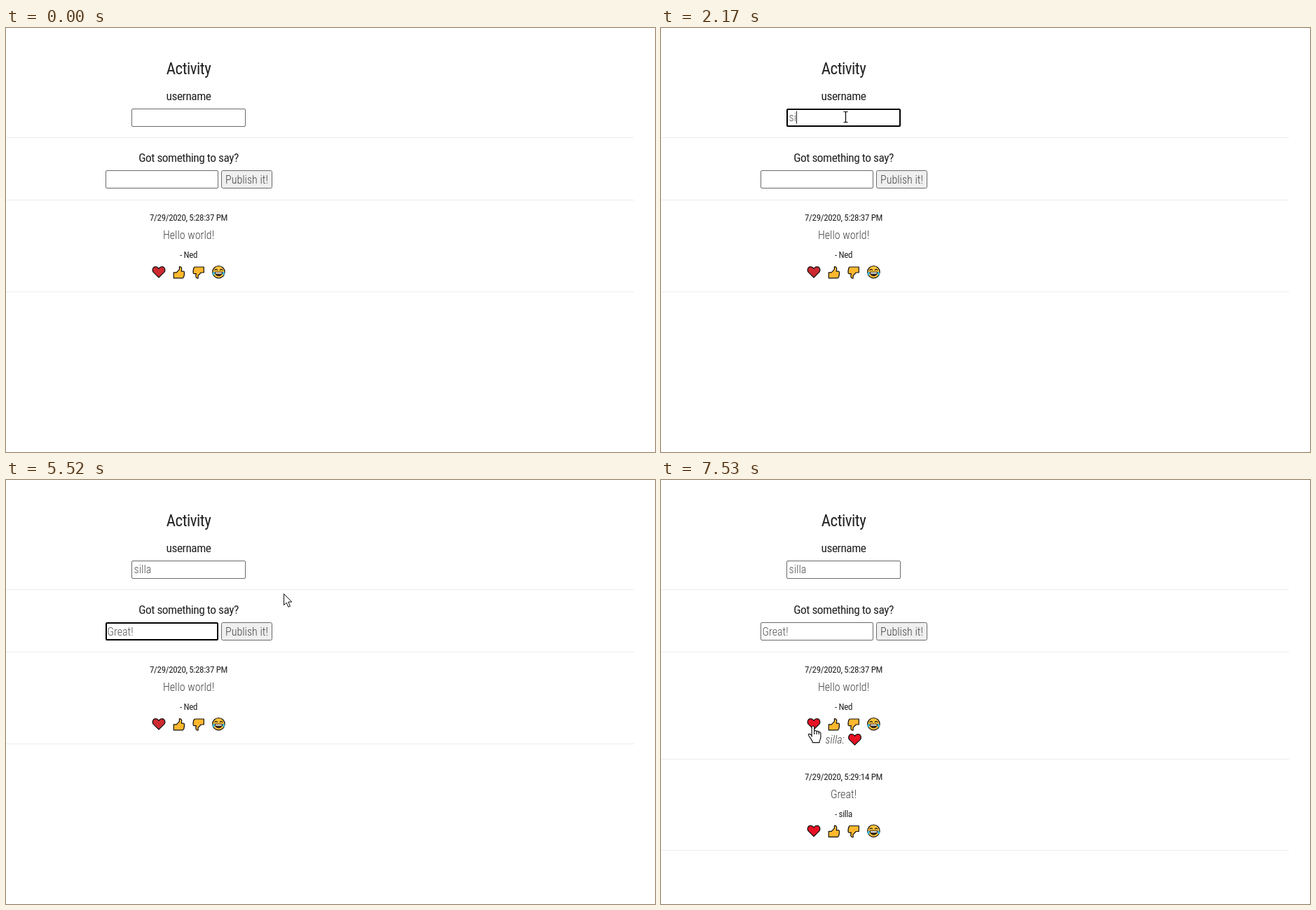
Animation, 926 px wide and 605 px high, one loop 8000 ms. Source, as an HTML page:

```html
<!DOCTYPE html>
<html lang="en">
<head>
<meta charset="utf-8">
<title>Message board</title>
<style>
  html, body { margin: 0; width: 100%; height: 100%; overflow: hidden; background: #fff; }
  svg { display: block; width: 926px; height: 605px; }
  text { font-family: "Roboto Condensed", Roboto, sans-serif; font-stretch: 75%; white-space: pre; }
  .mid { text-anchor: middle; }
  .head { fill: #222; font-size: 17.4px; letter-spacing: -.5px; }
  .title { font-size: 23px; }
  .small { font-size: 13px; letter-spacing: -.35px; }
  .body { fill: #444; font-size: 16px; font-weight: 300; }
  .typed { fill: #555; }
  .rule { stroke: #ececec; }
  .field, .button { fill: #fff; stroke: #6a6a6a; }
  .button { fill: #efefef; }
  .field.hover { stroke: #222; }
  .button.hover { fill: #e4e4e4; stroke: #333; }
  .ring { fill: none; stroke: #000; stroke-width: 2; }
  .caret { stroke: #222; }
</style>
</head>
<body>
<svg viewBox="0 0 926 605">
  <defs>
    <path id="heart" d="M0 8 -7.6 .6C-10.3-2.6-8.2-7.4-4.6-7.4-2.4-7.4-1-6.2 0-4.7 1-6.2 2.4-7.4 4.6-7.4 8.2-7.4 10.3-2.6 7.6.6Z" stroke="#111" stroke-width="1.2" stroke-linejoin="round"/>
    <path id="thumb" d="M-7.6 0H-3.6L.6-4.4V-8.2C3.6-8.6 4.8-5.6 3.4-1.6H6.2C8-1.6 8 .8 7.2 1.2 8.2 2 7.8 3.6 7 4 7.6 5 7.2 6 6.4 6.4 6.6 7.4 6 8 5 8H-7.6Z" fill="#ffb82e" stroke="#111" stroke-width="1.2" stroke-linejoin="round"/>
    <g id="laugh">
      <circle r="8.7" fill="#ffc23a" stroke="#111" stroke-width="1.2"/>
      <path d="M-5.8-2.4Q-3.7-5.4-1.6-2.4M1.6-2.4Q3.7-5.4 5.8-2.4" fill="none" stroke="#111" stroke-width="1.2"/>
      <path d="M-5.4 0H5.4C5 7.4-5 7.4-5.4 0Z" fill="#3b2a20" stroke="#111" stroke-width=".8"/>
      <path d="M-4.7.5H4.7L4 2.4H-4Z" fill="#fff"/>
      <path d="M-5.6-.6C-9.5.2-9.4 4.6-7.4 4.6-5.4 4.4-5.4 2-5.6-.6ZM5.6-.6C9.5.2 9.4 4.6 7.4 4.6 5.4 4.4 5.4 2 5.6-.6Z" fill="#35b5dc"/>
    </g>
    <g id="buttons">
      <use href="#heart" x="218" y="348"/>
      <use href="#thumb" x="246.8" y="348.8"/>
      <use href="#thumb" transform="translate(274.7 349) rotate(180)"/>
      <use href="#laugh" x="303.4" y="348.2"/>
    </g>
  </defs>

  <path class="rule" d="M0 156.5H896M0 245.5H896"/>
  <text class="head title mid" x="260.5" y="66">Activity</text>
  <text class="head mid" x="260.5" y="103">username</text>
  <text class="head mid" x="260.5" y="190.5">Got something to say?</text>

  <g id="name">
    <rect class="field" x="179.5" y="115.5" width="162" height="25" rx="1.5"/>
    <rect class="ring" x="180" y="116" width="161" height="24" rx="1.5"/>
    <text class="body typed" x="182.5" y="133"></text>
    <path class="caret" d="M.5 118.5V136.5"/>
  </g>
  <g id="message">
    <rect class="field" x="142.5" y="203.5" width="160" height="25" rx="1.5"/>
    <rect class="ring" x="143" y="204" width="159" height="24" rx="1.5"/>
    <text class="body typed" x="144.5" y="221.5"></text>
    <path class="caret" d="M.5 206.5V224.5"/>
  </g>
  <rect id="publish" class="button" x="307.5" y="203.5" width="72" height="25" rx="2"/>
  <text class="body mid" x="343.5" y="221.5">Publish it!</text>

  <g id="first">
    <text class="head small mid" x="260.5" y="275">7/29/2020, 5:28:37 PM</text>
    <text class="body mid" x="260.5" y="301">Hello world!</text>
    <text class="head small mid" x="260.5" y="328">- Ned</text>
    <use href="#buttons"/>
  </g>
  <g id="reply" fill="#e81224">
    <text class="body" x="234.5" y="376" font-style="italic">silla:</text>
    <use href="#heart" x="276.5" y="370"/>
  </g>
  <path id="firstRule" class="rule" d="M0 376.5H896"/>
  <g id="second" fill="#e81224">
    <text class="head small mid" x="260.5" y="275">7/29/2020, 5:29:14 PM</text>
    <text class="body mid" x="260.5" y="301">Great!</text>
    <text class="head small mid" x="260.5" y="328">- silla</text>
    <use href="#buttons"/>
    <path class="rule" d="M0 376H896"/>
  </g>

  <g id="cursor" stroke-linejoin="round">
    <path id="arrow" d="M.5.5V16.5L4.2 13 6.8 19.2 9.4 18.1 6.8 12H11.8Z" fill="#fff" stroke="#111"/>
    <path id="beam" d="M-3-7.5H-1Q0-7.5 0-6.5 0-7.5 1-7.5H3M0-6.5V6.5M-3 7.5H-1Q0 7.5 0 6.5 0 7.5 1 7.5H3" fill="none" stroke="#000" stroke-width="1.2"/>
    <path id="hand" transform="scale(1.05)" d="M-1.8 14.5V1.6C-1.8-.5 1.6-.5 1.6 1.6V7.4C2 5.6 4.8 5.8 4.8 7.8 5.4 6.4 7.8 6.8 7.8 8.8 8.4 7.8 10.4 8.2 10.4 10.2V15C10.4 18 8.6 19 8.6 22.5H-.6C-.6 19.5-3.4 17.6-6.2 12.6-7 10.6-4.6 9.8-1.8 13ZM1.6 7.4V11.5M4.8 7.8V11.5M7.8 8.8V11.5" fill="#fff" stroke="#111" stroke-width="1.1"/>
  </g>
</svg>
<script>
const LOOP = 8000;
const $ = id => document.getElementById(id);
const show = (el, on) => el.setAttribute("visibility", on ? "visible" : "hidden");
const latest = (steps, t) => steps.filter(s => s[0] <= t).pop();
const within = (t, ...spans) => spans.some(([a, b]) => t >= a && t < b);

// A run of evenly timed pointer stops: [shape, x, y].
const run = (from, to, stops) =>
  stops.map((s, i) => [from + (to - from) * i / (stops.length - 1) - 1, ...s]);

const pointer = [
  [0, "", 0, 0],
  ...run(70, 610, [
    ["arrow", 458, 276], ["arrow", 436, 230], ["arrow", 398, 174], ["arrow", 350, 126],
    ["arrow", 310, 97], ["beam", 284, 103], ["beam", 271, 118], ["beam", 267.5, 128]]),
  [1700, "beam", 265.5, 127.5],
  [1770, "beam", 263.5, 127],
  ...run(5210, 5990, [
    ["beam", 270, 128], ["beam", 292, 131], ["beam", 324, 135], ["arrow", 364, 146],
    ["arrow", 396, 162], ["arrow", 408, 180], ["arrow", 404, 196], ["arrow", 392, 208],
    ["hand", 377, 213], ["hand", 371, 214], ["hand", 370, 214]]),
  ...run(6610, 7160, [
    ["hand", 362, 221], ["arrow", 328, 254], ["arrow", 280, 302], ["arrow", 236, 342],
    ["arrow", 213, 359], ["arrow", 207, 358], ["hand", 214, 353], ["hand", 217, 351]])
];

const fields = [
  { el: $("name"), text: "silla", keys: [2090, 2170, 2330, 2470, 2550],
    focus: [1390, 2940], caret: [[1470, 1940], [2090, 2940]], hover: [[455, 5440]] },
  { el: $("message"), text: "Great!", keys: [3960, 4200, 4277, 4353, 4430, 4830],
    focus: [2940, 5910], caret: [[2940, 3490], [3960, 5330], [5830, 5910]], hover: [] }
];

function drawField({ el, text, keys, focus, caret, hover }, t) {
  const [box, ring, label, bar] = el.children;
  label.textContent = text.slice(0, keys.filter(k => k <= t).length);
  box.classList.toggle("hover", within(t, ...hover));
  show(ring, within(t, focus));
  const end = +label.getAttribute("x") + label.getComputedTextLength();
  bar.setAttribute("transform", `translate(${Math.round(end)} 0)`);
  show(bar, within(t, ...caret));
}

function draw(t) {
  fields.forEach(f => drawField(f, t));

  const [, shape, x, y] = latest(pointer, t);
  $("cursor").setAttribute("transform", `translate(${x} ${y})`);
  for (const id of ["arrow", "beam", "hand"]) show($(id), id === shape);
  $("publish").classList.toggle("hover", within(t, [5833, 6688]));

  const liked = t >= 7460;
  $("first").setAttribute("fill", t >= 7390 ? "#e81224" : "#cd2a30");
  show($("reply"), liked);
  show($("second"), t >= 6060);
  $("firstRule").setAttribute("transform", `translate(0 ${liked ? 22 : 0})`);
  $("second").setAttribute("transform", `translate(0 ${liked ? 152.5 : 130.5})`);
}

const start = performance.now();
function tick() {
  draw((performance.now() - start) % LOOP);
  requestAnimationFrame(tick);
}
tick();
</script>
</body>
</html>
```
